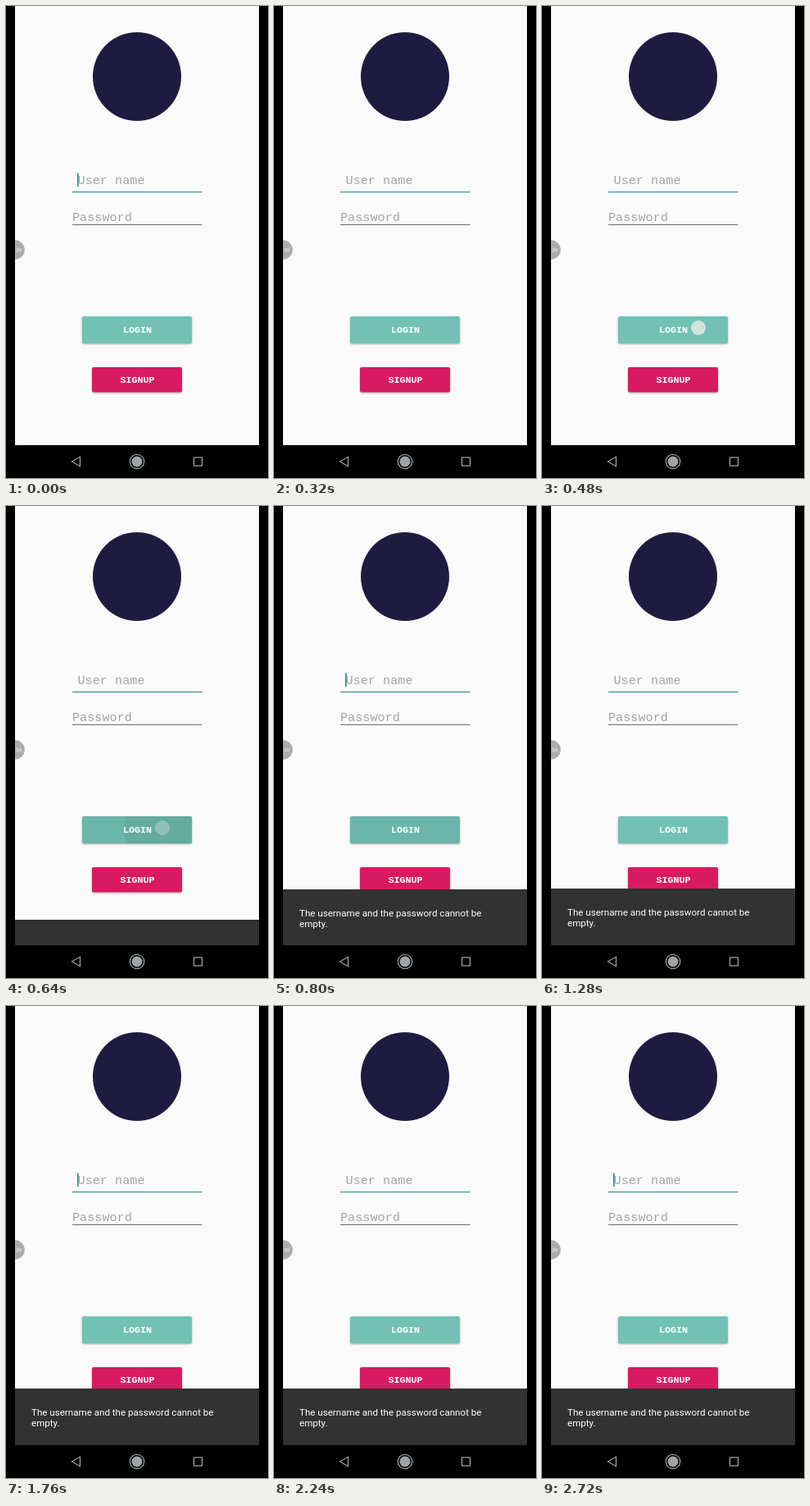
An HTML page for the animation above (2880 ms loop, 320 px wide and 575 px high).

```html
<!DOCTYPE html>
<html lang="en">
<head>
<meta charset="utf-8">
<title>Login form</title>
<style>
  html, body { margin: 0; width: 100%; height: 100%; overflow: hidden; background: #000; }
  svg { display: block; width: 320px; height: 575px; }
  text { white-space: pre; }
  .hint { font: 15.2px "Liberation Mono", monospace; fill: #a3a3a3; }
  .label { font: bold 11.7px "Liberation Mono", monospace; fill: #fff; text-anchor: middle; }
  .message { font: 11.6px Roboto, sans-serif; fill: #fff; }
  .badge { font: 6px "Liberation Mono", monospace; fill: #fff; }
  .shadow { filter: drop-shadow(0 1px 1px rgba(0, 0, 0, .32)); }
  .nav { fill: none; stroke: #98a0a2; stroke-width: 1.3; }
</style>
</head>
<body>
<svg viewBox="0 0 320 575">
  <defs>
    <clipPath id="screen"><rect x="11" width="298" height="535"/></clipPath>
    <clipPath id="loginShape"><rect x="93" y="378" width="134" height="33" rx="2"/></clipPath>
  </defs>
  <rect width="320" height="575"/>

  <g clip-path="url(#screen)">
    <rect x="11" width="298" height="535" fill="#fafafa"/>
    <circle cx="160" cy="86" r="54" fill="#1f1b40"/>

    <text class="hint" x="87.5" y="217">User name</text>
    <rect x="81" y="226" width="158.5" height="1.2" fill="#38908e"/>
    <rect id="caret" x="87" y="203.5" width="1.6" height="16.5" fill="#2c8a86"/>
    <text class="hint" x="81" y="261.5">Password</text>
    <rect x="81" y="266" width="158.5" height="1" fill="#6c6c72"/>

    <circle cx="11" cy="297" r="11.8" fill="#acabae"/>
    <text class="badge" x="12" y="299">30</text>

    <rect id="login" class="shadow" x="93" y="378" width="134" height="33" rx="2"/>
    <g clip-path="url(#loginShape)">
      <circle id="ripple" cx="191" cy="392" r="47" fill="#65ac9f"/>
    </g>
    <text class="label" x="160.5" y="398">LOGIN</text>
    <rect class="shadow" x="105" y="440" width="110" height="30.5" rx="2" fill="#d81b60"/>
    <text class="label" x="160.5" y="459">SIGNUP</text>
    <circle id="touch" cx="191" cy="392" r="9" fill="#dce6e4"/>

    <g id="snackbar">
      <rect x="11" width="298" height="70" fill="#323232"/>
      <g id="message" class="message">
        <text x="31" y="33">The username and the password cannot be</text>
        <text x="31" y="46.3">empty.</text>
      </g>
    </g>
  </g>

  <g class="nav">
    <path d="M80.5 555 90.5 549.3V560.7Z"/>
    <circle cx="160" cy="555" r="8.7"/>
    <circle cx="160" cy="555" r="6.5" fill="#a0a3a5" stroke="none"/>
    <rect x="229.5" y="550" width="10" height="10"/>
  </g>
</svg>

<script>
  const LOOP = 2880;
  const BLINK = 480;
  const $ = id => document.getElementById(id);
  const [caret, login, ripple, touch, snackbar, message] =
    ['caret', 'login', 'ripple', 'touch', 'snackbar', 'message'].map($);

  // Each step holds until the next one starts.
  const steps = [
    { at: 0, bar: 535, fill: '#72c1b4', touch: 0, ripple: 0, text: 0 },
    { at: 480, bar: 535, fill: '#72c1b4', touch: .9, ripple: 0, text: 0 },
    { at: 640, bar: 504, fill: '#6bb5aa', touch: .35, ripple: 1, text: 0 },
    { at: 800, bar: 467, fill: '#6bb5aa', touch: 0, ripple: 0, text: 1 },
    { at: 960, bar: 466, fill: '#6fbcb0', touch: 0, ripple: 0, text: 1 },
    { at: 1120, bar: 466, fill: '#72c1b4', touch: 0, ripple: 0, text: 1 }
  ];

  const caretOn = t => t < 320 || Math.floor((t - 320) / BLINK) % 2 === 1;

  function draw(t) {
    const s = steps.filter(step => step.at <= t).pop();
    caret.style.opacity = caretOn(t) ? 1 : 0;
    login.style.fill = s.fill;
    touch.style.opacity = s.touch;
    ripple.style.opacity = s.ripple;
    message.style.opacity = s.text;
    snackbar.setAttribute('transform', `translate(0 ${s.bar})`);
  }

  const start = performance.now();
  function tick() {
    draw((performance.now() - start) % LOOP);
    requestAnimationFrame(tick);
  }
  tick();
</script>
</body>
</html>
```
